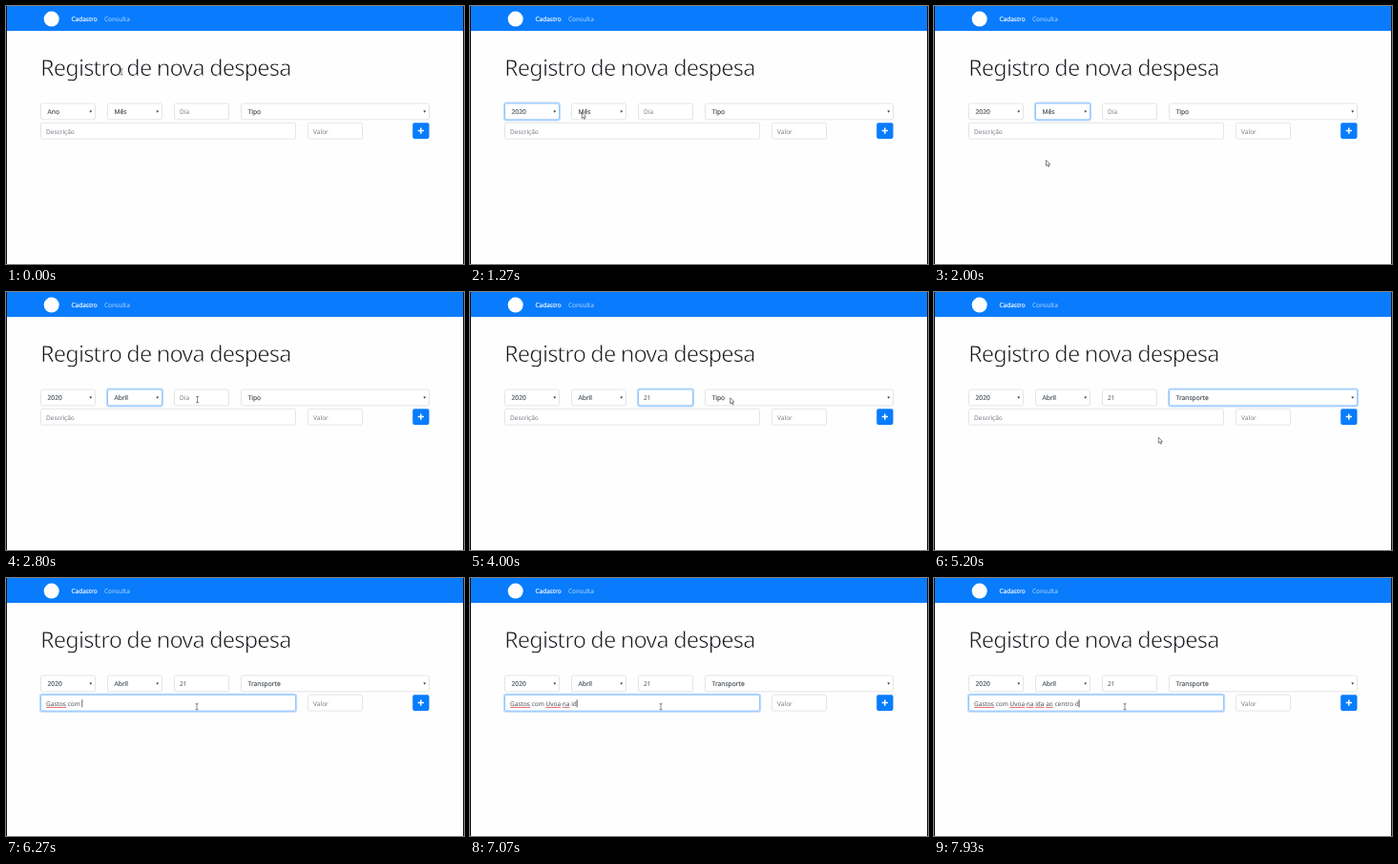
Write an HTML page that moves like this. It is 480x270 px and loops after 8000 ms.

```html
<!DOCTYPE html>
<html lang="pt">
<head>
<meta charset="utf-8">
<title>Registro de nova despesa</title>
<style>
  html, body { margin: 0; width: 100%; height: 100%; overflow: hidden; background: #fefefe; }
  svg { display: block; width: 480px; height: 270px; }
  text { font: 6.5px "Noto Sans", "Open Sans", sans-serif; fill: #495057; white-space: pre; text-rendering: geometricPrecision; }
  .strong { font-size: 6.7px; stroke: #495057; stroke-width: .15; }
  .hint { fill: #747c84; }
  .nav { fill: #fff; stroke: #fff; stroke-width: .15; }
  .dim { opacity: .55; }
  /* the background-coloured outline thins the strokes to a light weight */
  .title { font-size: 23.6px; letter-spacing: -.86px; fill: #14181c; stroke: #fefefe; stroke-width: .7; }
  .box { fill: #fff; stroke: #dbe0e4; stroke-width: .8; }
  .ring { fill: none; stroke: #007bff; stroke-opacity: .27; stroke-width: 1.4; visibility: hidden; }
  .on .box { stroke: #7cb9fb; }
  .on .ring { visibility: visible; }
</style>
</head>
<body>
<svg id="stage" viewBox="0 0 480 270"></svg>
<script>
const LOOP = 8000, FPS = 15, BLUE = '#087cfc';
const stage = document.getElementById('stage');

function add(tag, attrs, parent = stage) {
  const el = document.createElementNS('http://www.w3.org/2000/svg', tag);
  for (const k in attrs) el.setAttribute(k, attrs[k]);
  return parent.appendChild(el);
}
function label(str, x, y, cls, parent = stage) {
  const el = add('text', { x, y, class: cls }, parent);
  el.textContent = str;
  return el;
}
function field(hint, x, y, w, isSelect) {
  const g = add('g', {}), tx = x + (isSelect ? 7 : 5.6), ty = y + 11.3;
  add('rect', { class: 'ring', x: x - .9, y: y - .9, width: w + 1.8, height: 18.6, rx: 2.6 }, g);
  add('rect', { class: 'box', x, y, width: w, height: 16.8, rx: 1.8 }, g);
  if (isSelect) add('path', { d: `M${x + w - 6.2} ${y + 7.5}h2.8l-1.4 2.3z`, fill: '#343a40' }, g);
  return { g, hint, tx, ty, isSelect, text: label(hint, tx, ty, '', g) };
}

// Page
add('rect', { width: 480, height: 26, fill: BLUE });
for (const x of [0, 479]) add('rect', { x, width: 1, height: 270, fill: '#111' });
add('circle', { cx: 47.7, cy: 13.6, r: 8, fill: '#fff' });
label('Cadastro', 68.4, 16.4, 'nav');
label('Consulta', 103, 16.4, 'nav dim');
label('Registro de nova despesa', 36, 72.8, 'title');

const year = field('Ano', 36.5, 102, 57, true);
const month = field('Mês', 106.5, 102, 57, true);
const day = field('Dia', 176.5, 102, 57);
const type = field('Tipo', 246.5, 102, 197, true);
const desc = field('Descrição', 36.5, 122.3, 267);
const value = field('Valor', 316.5, 122.3, 57);
const fields = [year, month, day, type, desc, value];

add('rect', { x: 426.2, y: 122.3, width: 17.3, height: 16.6, rx: 1.8, fill: BLUE });
add('path', { d: 'M431.7 130.6h6.2M434.8 127.5v6.2', stroke: '#fff', 'stroke-width': 1.5 });

const spell = add('path', { fill: 'none', stroke: '#e0393e', 'stroke-width': .75 });
const caret = add('path', { stroke: '#222', 'stroke-width': .7 });
const arrow = add('path', {
  d: 'M0 0V6L1.4 4.8L2.3 6.9L3.3 6.5L2.4 4.5L4.2 4.3Z',
  fill: '#fff', stroke: '#333', 'stroke-width': .6, 'stroke-linejoin': 'round'
});
const beam = add('path', {
  d: 'M-1.4 -3H1.4M0 -3V3M-1.4 3H1.4', fill: 'none', stroke: '#555', 'stroke-width': .7
});

// Pointer moves: start, end, x, y
const home = [121.3, 68.7];
const moves = [
  [0, 330, 83, 107],
  [470, 870, 83, 133],
  [1000, 1270, 117.3, 111.5],
  [1470, 2130, 117.5, 166],
  [2330, 2800, 200.6, 112.5],
  [3600, 4000, 272.7, 110.8],
  [4070, 4670, 281.5, 175],
  [5000, 5470, 200, 134.7]
];
const clicks = [[530, year], [1400, month], [3000, day], [4070, type], [5870, desc]];
const phrase = 'Gastos com Uvoa na ida ao centro d';
const flagged = /\b(Gastos|Uvoa|na|ida|ao)(?= )/g;

const ramp = (t, a, b) => Math.min(1, Math.max(0, (t - a) / (b - a)));
const easeOut = u => 1 - (1 - u) ** 1.5;

function pointer(t) {
  let [x, y] = home;
  for (const [a, b, toX, toY] of moves) {
    const e = easeOut(ramp(t, a, b));
    x += (toX - x) * e;
    y += (toY - y) * e;
  }
  return [x, y];
}

// A quick burst, a short hesitation, then a steady pace
const typedCount = t => Math.floor(
  12 * ramp(t, 5870, 6270) + 4 * ramp(t, 6270, 6670) + 18 * ramp(t, 6670, 7930) + .01);

const inside = (x, y, l, t, r, b) => x > l && x < r && y > t && y < b;
const overText = (x, y) => inside(x, y, 36, 48, 444, 82) ||
  inside(x, y, 176, 102, 234, 119) || inside(x, y, 180, 122, 304, 139);

function show(f, str) {
  f.text.textContent = str || f.hint;
  f.text.setAttribute('class', f.isSelect ? 'strong' : str ? '' : 'hint');
}
function caretPath(f, str) {
  const x = f.tx + (str ? f.text.getComputedTextLength() : 0) + .3;
  return `M${x} ${f.ty - 6.3}v8`;
}
function spellPath(str) {
  return [...str.matchAll(flagged)].map(m => {
    const a = desc.text.getStartPositionOfChar(m.index).x;
    const b = desc.text.getEndPositionOfChar(m.index + m[0].length - 1).x;
    return `M${a} 135.4H${b}`;
  }).join('');
}

function render(ms) {
  const t = Math.floor((ms % LOOP + 4) * FPS / 1000) * 1000 / FPS + 1;
  const active = clicks.filter(c => c[0] <= t).map(c => c[1]).pop();
  const dayText = '21'.slice(0, Math.floor(2 * ramp(t, 3460, 3600)));
  const descText = phrase.slice(0, typedCount(t));

  for (const f of fields) f.g.setAttribute('class', f === active ? 'on' : '');
  show(year, t >= 1070 && '2020');
  show(month, t >= 2330 && 'Abril');
  show(day, dayText);
  show(type, t >= 5060 && 'Transporte');
  show(desc, descText);
  show(value, '');
  spell.setAttribute('d', spellPath(descText));

  const blink = t < 3330 || t >= 3530 && t < 3930;
  caret.setAttribute('d', active === desc ? caretPath(desc, descText)
    : active === day && blink ? caretPath(day, dayText) : '');

  const [x, y] = pointer(t);
  const isText = overText(x, y);
  beam.style.display = isText ? '' : 'none';
  arrow.style.display = isText ? 'none' : '';
  (isText ? beam : arrow).setAttribute('transform', `translate(${x} ${y})`);
}

const start = performance.now();
function tick() {
  render(performance.now() - start);
  requestAnimationFrame(tick);
}
tick();
</script>
</body>
</html>
```
